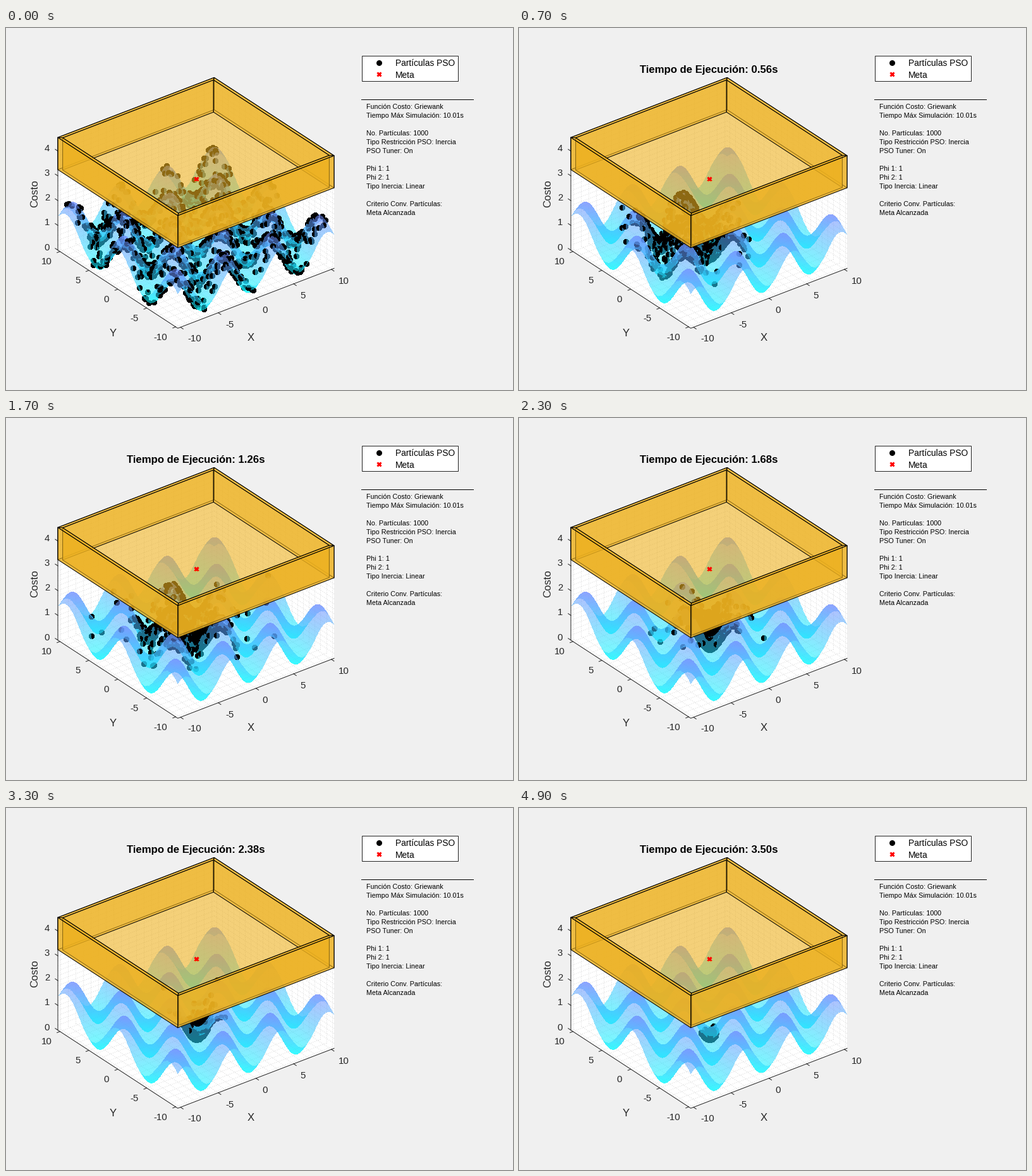
Recreate the animation shown at these times as a matplotlib script. Size 802 px wide and 573 px high, loop 5 s.

```python
import numpy as np
import matplotlib.pyplot as plt
from matplotlib.animation import FuncAnimation
from matplotlib.collections import LineCollection
from matplotlib.patches import Polygon, Rectangle

W, H, DPI = 802, 573, 100
FRAMES, INTERVAL = 50, 100
PX = 72 / DPI

# Orthographic view: azimuth -37.5 deg, elevation 30 deg
AZ, EL = np.radians(37.5), np.radians(30)
SCALE, Z_SCALE = 15.04, 39.2
CX, CY = 300.5, 366
LIMIT, RANGE = 10.36, 10
BASE, TOP = 3.25, 4.55
INK = "#262626"

plt.rcParams["font.family"] = "Liberation Sans"


def griewank(x, y):
    return 1 + (x**2 + y**2) / 4000 - np.cos(x) * np.cos(y / np.sqrt(2))


def project(x, y, z=0.0):
    u = CX + SCALE * (x * np.cos(AZ) - y * np.sin(AZ))
    toward = -x * np.sin(AZ) - y * np.cos(AZ)
    return u, CY + SCALE * toward * np.sin(EL) - Z_SCALE * z


def depth(toward, z):
    """Closeness to the camera, in pixels."""
    return SCALE * toward * np.cos(EL) + Z_SCALE * z * np.tan(EL)


# ---- surface: every crossing of each pixel's view ray, far to near ----
X0, X1, Y0, Y1 = 60, 540, 160, 500
ALPHA = 0.55


def trace_surface(max_layers=16):
    u = (np.arange(X0, X1) + 0.5 - CX) / SCALE
    v = (np.arange(Y0, Y1) + 0.5)[:, None]
    shape = (max_layers, Y1 - Y0, X1 - X0)
    depths, colors = np.full(shape, -np.inf), np.zeros(shape + (3,))
    count = np.zeros(shape[1:], int)

    def sample(g):
        x = u * np.cos(AZ) - g * np.sin(AZ)
        y = -u * np.sin(AZ) - g * np.cos(AZ)
        z = griewank(x, y)
        z[(abs(x) > LIMIT) | (abs(y) > LIMIT)] = np.nan
        return z, CY + SCALE * g * np.sin(EL) - Z_SCALE * z

    steps = np.arange(-1.42 * LIMIT, 1.42 * LIMIT, 0.04)
    z, line = sample(steps[0])
    for g in steps[1:]:
        next_z, next_line = sample(g)
        hit = ((v >= line) & (v < next_line)) | ((v < line) & (v >= next_line))
        rows, cols = np.nonzero(hit & (count < max_layers))
        if rows.size:
            layer = count[rows, cols]
            height = (z[cols] + next_z[cols]) / 2
            t = height / TOP
            depths[layer, rows, cols] = depth(g - 0.02, height)
            colors[layer, rows, cols] = np.stack([t, 1 - t, np.ones_like(t)], -1)
            count[rows, cols] += 1
        z, line = next_z, next_line
    used = count.max()
    return depths[:used], colors[:used]


LAYER_DEPTH, LAYER_COLOR = trace_surface()

# ---- swarm: damped oscillation about a drifting centre ----
rng = np.random.default_rng(4)
COUNT = 1000
start = rng.uniform(-1, 1, (2, COUNT))
swing = rng.normal(0, 0.5, (2, COUNT))
omega = rng.uniform(0.7, 1.2, (2, COUNT))
stray = rng.random(COUNT) < 0.05

KEYS = [0, 3, 7, 12, 17, 22, 28, 38, 49]
CENTER_X = [0, -1.2, -2, -0.7, -1.2, -0.4, 0.1, 0, 0]
CENTER_Y = [0, 0.6, 1, 0.3, 0.6, 0.2, 0, 0, 0]
SPREAD = [10, 6.5, 4.2, 3.5, 3.8, 2.4, 1.3, 0.9, 0.55]
STRAY = [1, 1, 1.1, 1.3, 2.2, 2.2, 2.8, 1.8, 1.3]

dy, dx = np.mgrid[-5:6, -5:6]
inside = dx**2 + dy**2 <= 20
DISC_X, DISC_Y = dx[inside], dy[inside]


def swarm(k):
    def at(values):
        return np.interp(k, KEYS, values)

    reach = at(SPREAD) * np.where(stray, at(STRAY), 1)
    offset = reach * (start * np.cos(omega * k) + swing * np.sin(omega * k))
    center = np.array([[at(CENTER_X)], [at(CENTER_Y)]])
    return np.clip(center + offset, -RANGE, RANGE)


def render(k):
    x, y = swarm(k)
    z = griewank(x, y)
    u, v = project(x, y, z)
    near = depth(-x * np.sin(AZ) - y * np.cos(AZ), z)
    cols = np.floor(u - X0).astype(int)[:, None] + DISC_X
    rows = np.floor(v - Y0).astype(int)[:, None] + DISC_Y
    discs = np.full(LAYER_DEPTH.shape[1:], -np.inf)
    np.maximum.at(discs, (rows, cols), np.broadcast_to(near[:, None], rows.shape))

    rgb = np.zeros(discs.shape + (3,))
    alpha = np.isfinite(discs).astype(float)
    for layer, color in zip(LAYER_DEPTH, LAYER_COLOR):
        a = ALPHA * (layer > discs)
        rgb = rgb * (1 - a[..., None]) + color * a[..., None]
        alpha = alpha * (1 - a) + a
    rgb /= np.maximum(alpha, 1e-6)[..., None]
    return np.clip(np.dstack([rgb, alpha]), 0, 1)


# ---- stage ----
fig = plt.figure(figsize=(W / DPI, H / DPI), dpi=DPI, facecolor="#f0f0f0")
ax = fig.add_axes([0, 0, 1, 1])
ax.axis("off")


def label(x, y, text, size=15, color=INK, ha="center", **kw):
    return ax.text(x, y, text, fontsize=size * PX, color=color, ha=ha,
                   va=kw.pop("va", "center_baseline"), **kw)


def line(points, color=INK, z=2):
    ax.plot(*zip(*points), color=color, lw=PX, zorder=z)


def face(corners, z, color=(1, 1, 1), edge="none"):
    ax.add_patch(Polygon([project(*c) for c in corners], fc=color, ec=edge,
                         lw=PX, joinstyle="round", zorder=z))


def draw_axes():
    L = LIMIT
    face([(-L, -L, 0), (L, -L, 0), (L, -L, TOP), (L, L, TOP),
          (-L, L, TOP), (-L, L, 0)], 0)
    grid = []
    for i in range(-10, 11):
        grid += [[(i, -L, 0), (i, L, 0)], [(-L, i, 0), (L, i, 0)],
                 [(i, L, 0), (i, L, TOP)], [(L, i, 0), (L, i, TOP)]]
    for h in np.arange(0.2, TOP, 0.2):
        grid += [[(-L, L, h), (L, L, h)], [(L, -L, h), (L, L, h)]]
    ax.add_collection(LineCollection(
        [[project(*p) for p in seg] for seg in grid], colors="#d8d8d8",
        linewidths=PX, linestyles=[(0, (1, 2))], zorder=1))

    line([project(-L, L, TOP), project(-L, L), project(-L, -L), project(L, -L)])

    def tick(point, step):
        line([point, (point[0] + step[0], point[1] + step[1])])

    for i, value in enumerate(range(-10, 11, 5)):
        tick(project(value, -L), (4.2, 2.8))
        tick(project(-L, value), (-4.6, 1.8))
        text = str(value)
        label((298, 354, 410, 470, 534)[i], 491 - 22.8 * i, text)
        label((244, 203, 159, 114, 64)[i], 489 - 30.2 * i, text)
    for value in range(5):
        tick(project(-L, L, value), (-4.2, -2.8))
        label(65, 346 - 39.2 * value, str(value))
    label(387, 489, "X", 16.7)
    label(169, 482, "Y", 16.7)
    label(46, 262, "Costo", 16.7, rotation=90, va="center")


def draw_tray():
    amber = (0.929, 0.694, 0.125, 0.6)

    def ring(r):
        return [(-r, r), (r, r), (r, -r), (-r, -r)]

    def wall(r, i, z):
        a, b = ring(r)[i], ring(r)[(i + 1) % 4]
        face([(*a, BASE), (*b, BASE), (*b, TOP), (*a, TOP)], z, amber, "black")

    face([(*p, BASE) for p in ring(LIMIT)], 5, amber)
    for i in (0, 1):
        wall(LIMIT, i, 6)
        wall(RANGE, i, 6.5)
    for i in (2, 3):
        wall(RANGE, i, 8)
        wall(LIMIT, i, 8.5)
    for i in range(4):
        j = (i + 1) % 4
        rim = [ring(LIMIT)[i], ring(LIMIT)[j], ring(RANGE)[j], ring(RANGE)[i]]
        face([(*p, TOP) for p in rim], 9, amber, "black")


def cross(x, y, color="red", z=12):
    return ax.plot([x], [y], "x", color=color, ms=6.5 * PX, mew=3 * PX,
                   zorder=z)[0]


def draw_legend():
    ax.add_patch(Rectangle((562.5, 43.5), 152, 40, fc="white", ec=INK, lw=PX,
                           zorder=10))
    ax.plot([589.5], [54.5], "o", color="black", ms=9 * PX, mew=0, zorder=11)
    cross(589.5, 73)
    label(616, 54.5, "Partículas PSO", 13.75, "black", "left", zorder=11)
    label(616, 73.5, "Meta", 13.75, "black", "left", zorder=11)


def draw_info():
    line([(562, 112.5), (739, 112.5)], "black")
    rows = ["Función Costo: Griewank", "Tiempo Máx Simulación: 10.01s", "",
            "No. Partículas: 1000", "Tipo Restricción PSO: Inercia",
            "PSO Tuner: On", "", "Phi 1: 1", "Phi 2: 1",
            "Tipo Inercia: Linear", "", "Criterio Conv. Partículas:",
            "Meta Alcanzada"]
    for i, text in enumerate(rows):
        label(570, 128 + 14 * i, text, 10.7, "black", "left", va="baseline")


draw_axes()
draw_tray()
draw_legend()
draw_info()

# The goal's lower tip dips below the tray floor
goal = project(0, 0, BASE)
cross(*goal, "#f08018", 5.5)
tip = cross(*goal, z=5.6)
tip.set_clip_path(Rectangle((goal[0] - 8, goal[1] - 8), 16, 10.5,
                            transform=ax.transData))

scene = ax.imshow(render(0), extent=(X0, X1, Y1, Y0), aspect="auto",
                  interpolation="nearest", zorder=4)
title = label(300.5, 71, "", 16.7, "black", weight="bold", va="baseline")
ax.set_xlim(0, W)
ax.set_ylim(H, 0)


def update(k):
    scene.set_data(render(k))
    title.set_text(f"Tiempo de Ejecución: {0.07 * (k + 1):.2f}s" if k else "")
    return scene, title


anim = FuncAnimation(fig, update, frames=FRAMES, interval=INTERVAL,
                     repeat=True, repeat_delay=0)
plt.show()
```
